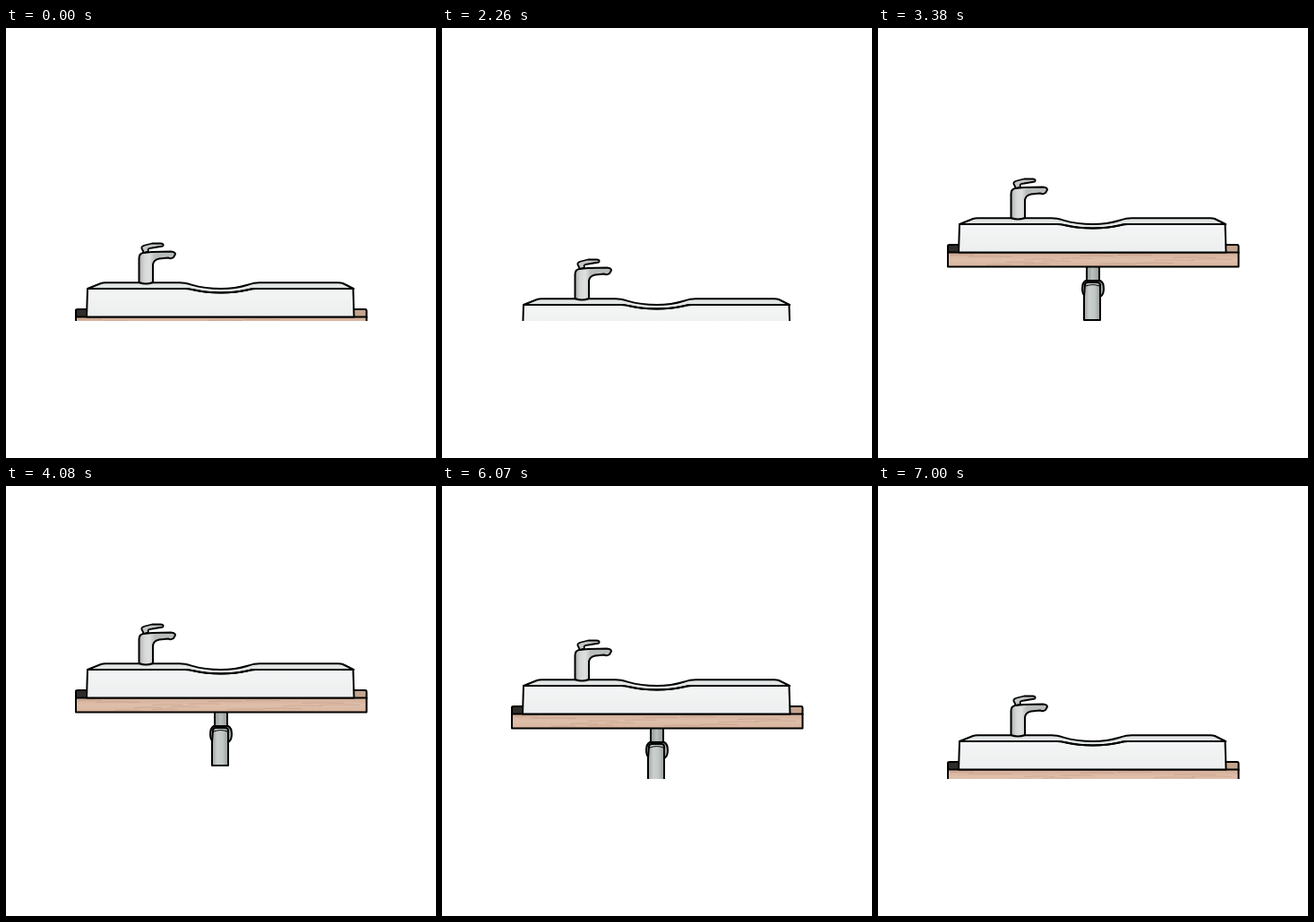
An HTML page with a canvas that plays this animation: 480x480 px, repeating every 7.07 s.

```html
<!DOCTYPE html>
<html lang="en">
<head>
<meta charset="utf-8">
<title>Washbasin</title>
<style>
  html, body { margin: 0; width: 100%; height: 100%; overflow: hidden; background: #fff; }
  canvas { display: block; width: 480px; height: 480px; }
</style>
</head>
<body>
<canvas id="stage" width="480" height="480"></canvas>
<script>
const ctx = document.getElementById('stage').getContext('2d');
const LOOP = 7070;
const FLOOR = 327;

// Cadence of the motion: [from, until, step] in ms.
const CADENCE = [
  [70, 670, 30], [1750, 2380, 30], [2380, 3080, 70],
  [3080, 4180, 100], [5270, 6370, 100], [6370, 7070, 70]
];

function hold(t) {
  const span = CADENCE.find(([from, until]) => t >= from && t < until);
  if (!span) return t < 70 ? 0 : t;
  const [from, , step] = span;
  return from + Math.floor((t - from) / step) * step;
}

const mix = (a, b, p) => a + (b - a) * p;

// Distance below the resting position; null while out of sight.
function drop(time) {
  const t = hold(time);
  const fall = u => 2.5e-5 * u * u;
  if (t < 670) return fall(1855 + t + Math.max(0, t - 70) * 0.14);
  if (t < 1750) return null;
  if (t < 2260) return mix(170, 104, (t - 1750) / 510);
  if (t < 2450) return mix(104, 74, (t - 2260) / 190);
  if (t < 4180) return 74 * Math.pow((4240 - t) / 1790, 2.25);
  if (t < 5270) return 0;
  return fall(t - 5215);
}

function shape(d, fill, width = 2) {
  const path = new Path2D(d);
  if (fill) {
    ctx.fillStyle = fill;
    ctx.fill(path);
  }
  if (width) {
    ctx.lineWidth = width;
    ctx.stroke(path);
  }
}

function shade(x0, y0, x1, y1, ...colors) {
  const g = ctx.createLinearGradient(x0, y0, x1, y1);
  colors.forEach((c, i) => g.addColorStop(i / (colors.length - 1), c));
  return g;
}

const metal = shade(148, 0, 166, 0, '#a4a8a6', '#d3d6d4', '#dfe1df', '#b9bdbb');
const chrome = shade(230, 0, 248, 0, '#9da4a1', '#cbd0cd', '#c1c7c4', '#979e9b');
const neck = shade(232, 0, 247, 0, '#8d9491', '#bac0bd', '#959c99');
const wood = shade(0, 237, 0, 252, '#d2ae98', '#dfbfaa', '#d8b49e');
const ceramic = shade(0, 205, 0, 236, '#f4f5f6', '#f0f2f2', '#eceeef');

function drawPipe() {
  shape('M233 252V271H247V252Z', neck);
  shape('M232 268Q228 270 228 277Q228 284 232 286H248Q252 284 252 277Q252 270 248 268Z', '#a3aaa7');
  shape('M231 273Q231 270 234 270H245Q248 270 248 273V312H230V286Z', chrome);
  shape('M232 274Q240 271 247 274', null, 1);
}

function drawPlank() {
  shape('M78 237V229Q78 228 80 228H91V237Z', '#302c29');
  shape('M388 237V228H401Q402.5 228 402.5 230V237Z', '#c5a58f');
  shape('M78 236.5H402.5V252.5H78Z', wood);
  ctx.save();
  ctx.strokeStyle = 'rgba(150,105,82,.22)';
  for (let i = 0; i < 15; i++) {
    const x = 81 + (i * 83) % 270;
    const y = 239.5 + (i * 5) % 12;
    shape(`M${x} ${y}q20 -1 ${26 + (i * 7) % 24} 0`, null, 1);
  }
  ctx.restore();
}

function drawBasin() {
  const rim = 'M91 205L106 199Q108 198.3 111 198.3H194C207 198.3 210 205 240 205C267 205 270 198.3 283 198.3H371Q374 198.3 376 199L388 205';
  const lip = 'H279C269 205 266 209.5 240 209.5C212 209.5 211 205 200 205H91';
  shape(rim + lip + 'Z', '#e2e5e5', 0);
  shape('M91 205H200C211 205 212 209.5 240 209.5C266 209.5 269 205 279 205H387.5L388.5 236.5H90Z', ceramic);
  shape(rim, null);
  shape('M388 205' + lip, null);
}

function drawFaucet() {
  shape('M148.5 198V171Q148.5 166 153 165L163 164L184 163.5Q189 164 189 166.5L187 170Q184 172 181 170.5L171 171.5Q165 172.5 164 178V198Q156 201 148.5 198Z', metal);
  shape('M154 165L151.5 160Q150.5 158 155 156.5L163 154.5L173 154.5Q177 155 175 157.5L163 159.5Q157 160 159 163Z', '#c2c6c4', 1.8);
}

function render() {
  const d = drop(performance.now() % LOOP);
  ctx.fillStyle = '#fff';
  ctx.fillRect(0, 0, 480, 480);
  if (d !== null) {
    ctx.save();
    ctx.beginPath();
    ctx.rect(0, 0, 480, FLOOR);
    ctx.clip();
    ctx.translate(0, Math.round(d));
    ctx.strokeStyle = '#000';
    ctx.lineJoin = ctx.lineCap = 'round';
    drawPipe();
    drawPlank();
    drawBasin();
    drawFaucet();
    ctx.restore();
  }
  requestAnimationFrame(render);
}
render();
</script>
</body>
</html>
```
